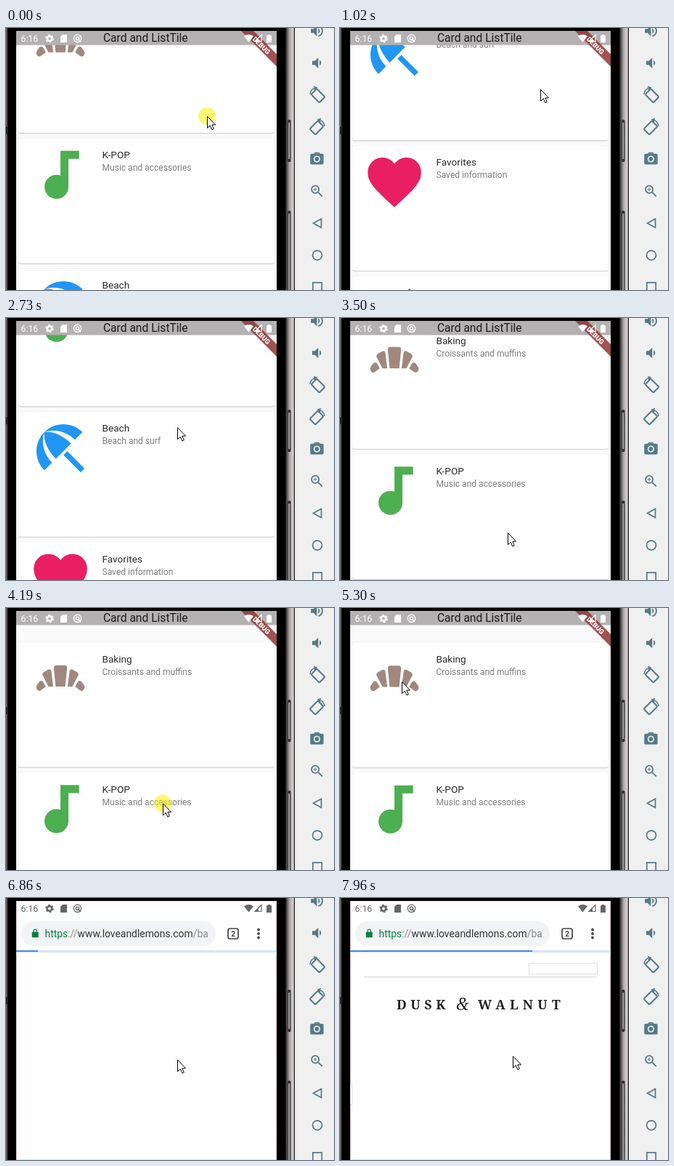
These frames come from a looping animation (452 by 360 pixels, 8000 ms). An HTML page:

```html
<!DOCTYPE html>
<html lang="en">
<head>
<meta charset="utf-8">
<title>Card list</title>
<style>
html, body { margin: 0; width: 100%; height: 100%; overflow: hidden; background: #000; }
svg { display: block; width: 452px; height: 360px; font-family: Roboto, sans-serif; }
.title { font-size: 13.6px; fill: #2a2a2a; }
.sub { font-size: 12.05px; fill: #7c7c7c; }
.brand { font: 900 18px "Noto Serif", serif; fill: #222; }
.line { fill: none; stroke: currentColor; stroke-width: 2; }
</style>
</head>
<body>
<svg id="stage" viewBox="0 0 452 360" xmlns="http://www.w3.org/2000/svg"></svg>
<script>
const LOOP = 8000;
const STEP = 77.5; // the picture is refreshed in even steps

// Icons on a 24 unit square
const wing = `<path d="M15.4 9.3Q15.6 8.2 16.6 8.6l1.6.9Q19.1 10.1 18.6 10.900L16.500 15h-1.800zM19.300 16.300L17.500 15l1-1.800Q19.200 12.400 20 13.200l.9 1.300Q21.300 15 21 15.600 20.400 17.100 19.300 16.300z"/>`;
const ICONS = {
  bakery: `<path d="M13.800 15h-3.600L9.500 8Q9.500 7 10.400 7h3.200Q14.500 7 14.500 8z"/>${wing}<g transform="translate(24) scale(-1 1)">${wing}</g>`,
  note: `<circle cx="10.500" cy="16.500" r="4.500"/><path d="M12 3h7v3h-4v10.500h-3z"/>`,
  beach: `<path d="M13.130 14.560l1.430-1.430L21 19.570 19.570 21zM17.420 8.830l2.860-2.860c-3.950-3.950-10.350-3.960-14.300-.02 3.930-1.300 8.310-.25 11.440 2.880zM5.950 5.980c-3.940 3.950-3.930 10.350.02 14.300l2.860-2.860C5.700 14.290 4.650 9.910 5.950 5.980zM5.960 5.970c-.38 3.010 1.170 6.880 4.300 10.020l5.730-5.730c-3.130-3.130-7.010-4.680-10.020-4.300z"/>`,
  heart: `<path d="M12 21.350C5.400 15.400 2 12.300 2 8.500A5.500 5.500 0 0 1 12 5.100A5.500 5.500 0 0 1 22 8.500C22 12.300 18.600 15.400 12 21.350z"/>`,
  pencil: `<path d="M3 17.200V21h3.800l11-11L14 6.200zM15.100 5.100L17.700 3l3.300 3.300-2.200 2.500z"/>`,
  loud: `<path d="M3 9v6h4l5 5V4L7 9zM14 8A4.500 4.500 0 0 1 14 16z"/><path class="line" d="M14 4.300A7.900 7.900 0 0 1 14 19.700"/>`,
  quiet: `<path d="M5 9v6h4l5 5V4L9 9zM16 8A4.500 4.500 0 0 1 16 16z"/>`,
  camera: `<rect x="2" y="4" width="20" height="16" rx="2"/><path d="M7 4l2-2h6l2 2z"/><circle cx="12" cy="12" r="5" fill="#f0f0f0"/><circle cx="12" cy="12" r="3.200"/>`,
  zoom: `<circle class="line" cx="9.500" cy="9.500" r="5.500"/><path class="line" d="M14 14l6 6"/><path class="line" d="M7 9.500h5M9.500 7v5" style="stroke-width:1.200"/>`,
  lock: `<rect x="4" y="8" width="16" height="14" rx="2"/><path class="line" d="M8 9V6a4 4 0 0 1 8 0v3"/>`
};

const CARDS = [
  ["Baking", "Croissants and muffins", "bakery", "#a1887f"],
  ["K-POP", "Music and accessories", "note", "#4caf50"],
  ["Beach", "Beach and surf", "beach", "#2196f3"],
  ["Favorites", "Saved information", "heart", "#e91e63"],
  ["Arts", "Drawing and painting", "pencil", "#616161"]
];
const PITCH = 179.2;

// A glide starts somewhere, then eases out through moves of [start, end, ...target]
const glide = (from, ...moves) => t => moves.reduce((now, [start, end, ...to]) => {
  const left = 1 - Math.min(1, Math.max(0, (t - start) / (end - start)));
  return now.map((v, i) => to[i] + (v - to[i]) * left ** 3);
}, from);

const scroll = glide([-28],
  [70, 150, -95], [390, 620, -290], [930, 1170, -415], [1720, 2490, -248],
  [2560, 2730, -230], [2960, 3740, 16], [3980, 4250, 47]);

const pointer = glide([277, 121],
  [70, 150, 283, 75], [390, 620, 294, -7], [930, 1170, 268, 125], [1390, 1490, 255, 165],
  [1720, 1930, 249, 326], [2550, 2730, 236, 150], [2960, 3480, 231, 295], [3580, 3790, 219, 153],
  [3980, 4250, 216, 270], [4400, 4880, 85, 101], [6460, 6640, 236, 222], [6860, 7270, 238, 217]);

const opening = glide([360], [5460, 5780, 4]);
const loaded = glide([0], [6460, 6640, 30], [6820, 7270, 235], [7790, 7900, 251]);

const PRESSES = [[0, 600], [1720, 1930], [2960, 3250], [3980, 4250], [5030, 5250]];

const icon = (name, x, y, scale, color) =>
  `<g fill="${color}" color="${color}" transform="translate(${x} ${y}) scale(${scale})">${ICONS[name]}</g>`;

const rect = (x, y, w, h, fill, extra = "") =>
  `<rect x="${x}" y="${y}" width="${w}" height="${h}" fill="${fill}" ${extra}/>`;

const card = ([title, sub, name, color], i) => `
  <g transform="translate(0 ${i * PITCH})">
    ${rect(16.5, -0.5, 354, 173.5, "#ececec", 'rx="4"')}
    ${rect(17, 1, 353, 172.2, "#cfcfcf", 'rx="3.5"')}
    ${rect(17, 0, 353, 172, "#fff", 'rx="3.5"')}
    ${icon(name, 31, 6.5, 3.67, color)}
    <text class="title" x="132.5" y="28">${title}</text>
    <text class="sub" x="132.5" y="45">${sub}</text>
  </g>`;

const statusIcons = color => `
  <g fill="${color}" stroke="${color}" stroke-width="0">
    <text x="20.5" y="18.8" font-size="12.3">6:16</text>
    <circle cx="60" cy="14.5" r="3.2" fill="none" stroke-width="2.6"/>
    <circle cx="60" cy="14.5" r="4.9" fill="none" stroke-width="1.8" stroke-dasharray="2.57"/>
    <path d="M78 9h6v11h-9v-8z"/>
    <circle cx="98.5" cy="14.3" r="5.2" fill="none" stroke-width="1.3"/>
    <circle cx="98.5" cy="14.3" r="2.2" fill="none" stroke-width="1.4"/>
    <path d="M99 15l4 4" stroke-width="1.4"/>
    <path d="M328 11.2q6.5-4.6 13 0l-6.5 8.300z"/>
    <path d="M343 18.5l9-9v9z" fill="none" stroke-width="1.2"/>
    <path d="M343 19l5-5v5z"/>
    <path d="M361 9h3v1.2h2V20h-7v-9.800h2z"/>
  </g>`;

const rotateIcon = (y, flip) => `
  <g transform="translate(429 ${y}) scale(${flip} 1)" fill="none" stroke="#557987" stroke-width="2">
    <rect x="-5.5" y="-8" width="11" height="16" rx="1.5" transform="translate(1 1) rotate(-45)"/>
    <path d="M-10 -1A10 10 0 0 1 -2 -10M-5 -11.5L-1 -10L-4 -7" stroke-width="1.700"/>
  </g>`;

const sidebar = () => {
  const tint = "#557987";
  const glyph = (name, i) => icon(name, 417.4, i * 44 - 7, 0.92, tint);
  return rect(398, 0, 54, 360, "#f0f0f0") +
    glyph("loud", 0) + glyph("quiet", 1) + rotateIcon(92, 1) + rotateIcon(136, -1) +
    glyph("camera", 4) + glyph("zoom", 5) +
    `<g fill="none" stroke="${tint}" stroke-width="1.7">
      <path d="M423.5 268.3l11-6v12z"/>
      <circle cx="429" cy="312.3" r="6.5"/>
      <rect x="422.8" y="349.8" width="12.4" height="12.4"/>
    </g>`;
};

const sideKey = (y, h) =>
  rect(388, y, 4.5, h, "#333", 'rx="1.5"') + rect(389.2, y + 4, 2, h - 8, "#aaa6a6");

const bezel = () =>
  rect(0, 0, 398, 360, "#000") +
  rect(0, 0, 2, 360, "#5c5a5a") + rect(0, 136, 3, 10, "#222") +
  rect(385, 0, 12, 360, "url(#metal)") + rect(396.8, 0, 1.2, 360, "#111") +
  sideKey(126, 58) + sideKey(251, 120);

const app = () =>
  rect(14, 4, 359, 356, "#fafafa") +
  `<g id="list">${CARDS.map(card).join("")}</g>` +
  rect(14, 4, 359, 19.5, "#b3b1b1") +
  `<text x="192.3" y="18.500" text-anchor="middle" font-size="15.6" fill="#1c1c1c">Card and ListTile</text>
  <path d="M324 4H341L373 36V53z" fill="#923434" fill-opacity=".85"/>
  <text transform="translate(352 24) rotate(45)" y="3.2" text-anchor="middle" font-size="9.2" font-weight="900" fill="#fff">DEBUG</text>` +
  statusIcons("#fff");

const browser = () =>
  rect(14, 4, 359, 356, "#fff", 'stroke="#f0c8d8" stroke-width="1.4"') + statusIcons("#666") +
  `<g id="toolbar">
    ${rect(21, 32, 268, 34, "#f1f3f4", 'rx="17"')}
    <rect x="306" y="42" width="14" height="14" rx="2.5" fill="none" stroke="#444" stroke-width="1.7"/>
    <text x="313" y="52.7" text-anchor="middle" font-size="10" font-weight="700" fill="#444">2</text>
    ${[43.5, 49, 54.5].map(y => `<circle cx="348" cy="${y}" r="1.9" fill="#444"/>`).join("")}
    ${rect(14, 73.5, 359, 3.5, "url(#shade)")}
  </g>
  <g id="address">
    <text id="url" y="54" font-size="13.9" fill="#333"><tspan id="scheme">https</tspan><tspan fill="#888">://</tspan>www.loveandlemons.com<tspan fill="#888">/ba</tspan></text>
    ${rect(14, 72, 359, 1.7, "#cfdffb")}
    <rect id="bar" x="14" y="72" height="1.7" fill="#2f74dc"/>
  </g>
  <g id="lock">${icon("lock", 33.5, 42, 0.56, "#0b8043")}</g>
  <g id="page">
    ${rect(33, 108, 321, 1, "#d6d6d6")}
    <rect x="260.5" y="89.5" width="94" height="15" fill="#fff" stroke="#ddd"/>
    <rect x="12" y="256.5" width="4.5" height="27" fill="#fff" stroke="#ddd"/>
    <text class="brand" x="78" y="153" letter-spacing="5.5">DUSK</text>
    <text class="brand" x="160" y="154" style="font-size:23px;font-style:italic;font-weight:400">&amp;</text>
    <text class="brand" x="190" y="153" letter-spacing="6.2">WALNUT</text>
  </g>`;

document.getElementById("stage").innerHTML = `
  <defs>
    <linearGradient id="metal"><stop stop-color="#111"/><stop offset=".25" stop-color="#6a6767"/><stop offset=".5" stop-color="#b0acac"/><stop offset="1" stop-color="#dedada"/></linearGradient>
    <linearGradient id="shade" x2="0" y2="1"><stop stop-color="#dde3ec"/><stop offset="1" stop-color="#fff"/></linearGradient>
    <clipPath id="screen"><rect x="14" y="4" width="359" height="356"/></clipPath>
    <clipPath id="opening"><rect id="reveal" x="14" width="359" height="360"/></clipPath>
  </defs>
  ${bezel()}
  <g clip-path="url(#screen)">${app()}<g clip-path="url(#opening)">${browser()}</g></g>
  ${sidebar()}
  <g id="pointer">
    <circle id="press" r="12" fill="#ffee00" fill-opacity=".55"/>
    <path d="M.5 .5v16l3.700-3.500 2.600 5.700 2.500-1.100L6.800 12h4.800z" fill="#fff" stroke="#000"/>
  </g>`;

const part = {};
document.querySelectorAll("[id]").forEach(el => part[el.id] = el);
const show = (el, on) => el.setAttribute("visibility", on ? "visible" : "hidden");

function draw(time) {
  const t = Math.floor(time / STEP) * STEP;
  part.list.setAttribute("transform", `translate(0 ${scroll(t)})`);
  part.pointer.setAttribute("transform", `translate(${pointer(t)})`);
  show(part.press, PRESSES.some(([from, to]) => t >= from && t < to));

  const secure = t >= 6820;
  part.reveal.setAttribute("y", opening(t));
  show(part.toolbar, t >= 6000);
  show(part.address, t >= 6460);
  show(part.lock, secure);
  show(part.page, t >= 7850);
  part.url.setAttribute("x", secure ? 53.5 : 35);
  part.scheme.setAttribute("fill", secure ? "#0b8043" : "#888");
  part.bar.setAttribute("width", loaded(t));
}

const begin = performance.now();
function tick() {
  draw((performance.now() - begin) % LOOP);
  requestAnimationFrame(tick);
}
tick();
</script>
</body>
</html>
```
